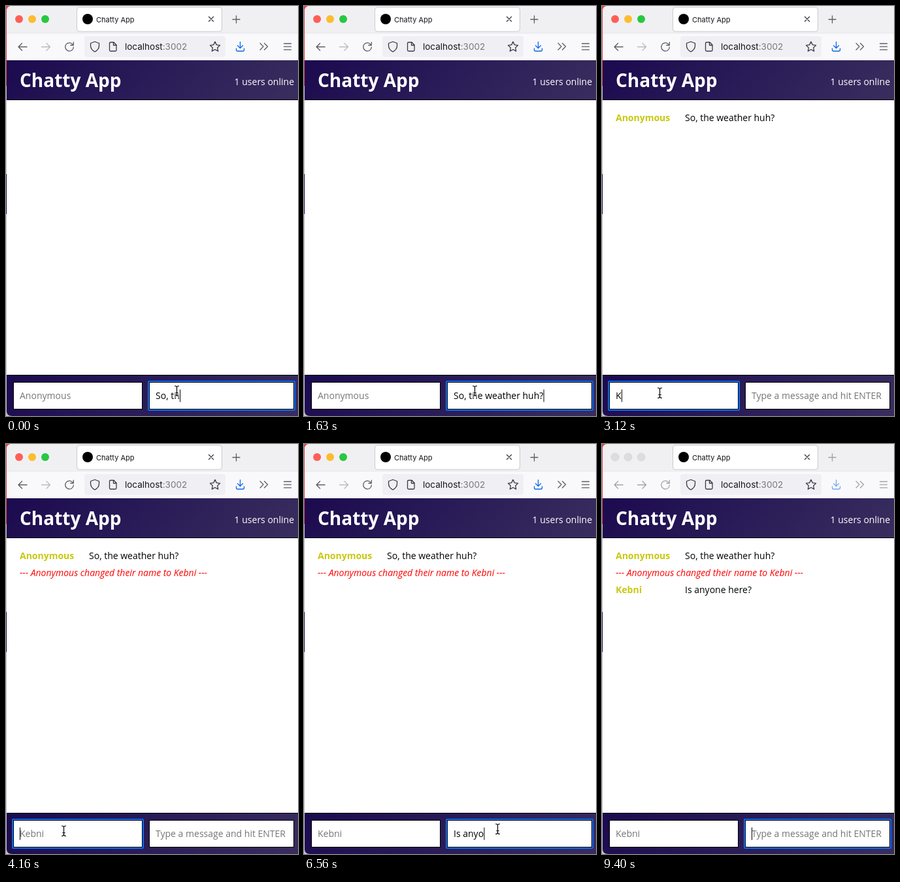
Write an HTML page that moves like this. It is 447 px wide and 627 px high and loops after 9500 ms.

```html
<!DOCTYPE html>
<html lang="en">
<head>
<meta charset="utf-8">
<title>Chatty App</title>
<style>
  html, body { margin: 0; width: 100%; height: 100%; overflow: hidden; background: #fff; }
  svg { display: block; width: 447px; height: 627px; }
  text { font: 14px "Open Sans", "Noto Sans", sans-serif; white-space: pre; }
  .ui { font-family: Inter, Roboto, sans-serif; fill: #15141a; }
  .author { font-weight: 700; fill: #c8c810; }
  .notice { font-style: italic; fill: #f00; }
  .line { fill: none; stroke: #5b5b66; stroke-width: 1.3; stroke-linecap: round; stroke-linejoin: round; }
  .dark { stroke: #3a3944; }
</style>
</head>
<body>
<svg viewBox="0 0 447 627">
  <defs>
    <linearGradient id="night" gradientUnits="userSpaceOnUse" x1="97" y1="-14" x2="351" y2="240">
      <stop offset="0" stop-color="#1b0a4f"/>
      <stop offset=".6" stop-color="#2d2059"/>
      <stop offset="1" stop-color="#3a2d5e"/>
    </linearGradient>
  </defs>

  <!-- desktop strip behind the window -->
  <rect width="447" height="627" fill="#c4c4c8"/>
  <rect width="8" height="122" fill="#dc4850"/>
  <rect y="257" width="1" height="61" fill="#1a1048"/>

  <!-- window -->
  <path d="M1 620V8Q1 0 9 0H447V627H9Q1 627 1 620Z" fill="#fff"/>
  <path d="M1 42V8Q1 0 9 0H447V42Z" fill="#f0f0f3"/>
  <rect x="1" y="42" width="446" height="41" fill="#f9f9fb"/>
  <rect x="1" y="41.5" width="446" height=".6" fill="#e2e2e7"/>

  <!-- tab strip -->
  <g id="lights" stroke-width=".5">
    <circle cx="20" cy="20" r="6"/>
    <circle cx="40" cy="20" r="6"/>
    <circle cx="60" cy="20" r="6"/>
  </g>
  <rect x="108.5" y="2" width="222" height="37" rx="4" fill="#fff" stroke="#c9c9cf" stroke-width="1"/>
  <circle cx="125" cy="20" r="8"/>
  <text class="ui" x="138" y="24.5" style="font-size:11px">Chatty App</text>
  <path class="line dark" stroke-width="1" d="M310.5 16.5l7 7m0-7l-7 7"/>

  <!-- toolbar -->
  <rect x="120" y="46" width="216" height="32" rx="4" fill="#f0f0f4"/>
  <g id="tools">
    <path class="line" d="M347 20.500h11m-5.500-5.500v11"/>
    <path class="line" d="M32 62.500H19m5.500-5.500l-5.500 5.500l5.500 5.500"/>
    <path class="line" id="forward" d="M54.500 62.500h13m-5.500-5.500l5.500 5.500l-5.500 5.500"/>
    <path class="line" d="M102.500 59.500A6.300 6.300 0 1 0 103.300 63M103.300 55.500v4.500h-4.500"/>
    <path class="line" style="stroke:#0a66e8" d="M358.500 55v9.500m-4-4l4 4l4-4M352.500 65v2q0 2 2 2h8q2 0 2-2v-2"/>
    <path class="line" d="M389 57l5 5l-5 5m6.500-10l5 5l-5 5"/>
    <path class="line" stroke-linecap="butt" d="M425.500 57.500h11m-11 4.700h11m-11 4.700h11"/>
  </g>
  <path class="line dark" d="M136 54.500l6.500 2.500v3.500q0 6-6.500 9.500q-6.500-3.500-6.500-9.500V57Z"/>
  <path class="line dark" d="M160 55.500h5l4 4v8q0 1.500-1.500 1.500h-7.500q-1.500 0-1.500-1.500V57q0-1.500 1.500-1.500Zm4.500 .5v4h4.500"/>
  <path class="line dark" d="M320 54.500l2.300 4.900l5.300 .7l-3.900 3.700l1 5.300l-4.700-2.600l-4.700 2.600l1-5.300l-3.900-3.700l5.300-.7Z"/>
  <text class="ui" x="182" y="67.300" style="font-size:13.5px">localhost<tspan fill="#77777f">:3002</tspan></text>

  <!-- header and footer -->
  <rect x="1" y="83" width="446" height="60" fill="url(#night)"/>
  <rect x="1" y="143" width="446" height="1"/>
  <text x="21" y="124" fill="#fff" style="font-size:28px;font-weight:700">Chatty App</text>
  <text x="441" y="121" fill="#fff" text-anchor="end">1 users online</text>
  <path transform="translate(0 482)" d="M1 83H447V145H9Q1 145 1 138Z" fill="url(#night)"/>
  <rect x="1" y="564" width="446" height="1"/>

  <g id="messages"></g>
  <g id="fields"></g>
  <rect id="caret" y="586.500" width="1" height="19"/>

  <g id="beam" fill="none" stroke-linecap="round">
    <path id="beamShape" d="M-3-7.500Q0-7.500 0-5V5.500Q0 8-3 8M3-7.500Q0-7.500 0-5M0 5.500Q0 8 3 8M-1.700 3h3.400" stroke="#fff" stroke-width="2.800"/>
    <use href="#beamShape" style="stroke:#000"/>
    <path d="M-3-7.500Q0-7.500 0-5V5.500Q0 8-3 8M3-7.500Q0-7.500 0-5M0 5.500Q0 8 3 8M-1.700 3h3.400" stroke="#000" stroke-width="1.200"/>
  </g>
  <path id="arrow" d="M0 0V14.500l3.300-3l2.200 5l2.400-1l-2.200-5h4.500Z" stroke="#fff"/>
</svg>

<script>
const LOOP = 9500, BLUR_AT = 9400;
const USER = "Kebni", FIRST = "So, the weather huh?", SECOND = "Is anyone here?";
const HINT = "Type a message and hit ENTER";

// Each track lists [time in ms, value]; a value holds until the next entry.
const firstTyped = [[0, 6], [150, 7], [300, 8], [450, 10], [600, 11], [750, 13], [890, 14],
  [1040, 16], [1190, 18], [1340, 19], [1630, 20], [1780, 0]];
const nameTyped = [[0, 0], [3120, 1], [3270, 2], [3570, 3], [3720, 4], [3860, 5], [4160, 0]];
const secondTyped = [[0, 0], [5660, 1], [5810, 2], [5960, 3], [6110, 4], [6260, 5], [6410, 6],
  [6560, 7], [6710, 8], [6860, 9], [7010, 11], [7150, 12], [7300, 13], [7450, 15], [7900, 0]];
const focusTrack = [[0, "message"], [2520, "name"], [4910, "message"]];
const caretTrack = [[0, true], [2520, false], [2670, true], [8500, false], [9100, true]];
const pointerTrack = [[0, [261, 588]], [2080, [222, 589]], [2220, [130, 591]], [2370, [92, 591]],
  [2520, [88, 591]], [4460, [120, 582]], [4610, [200, 549, "arrow"]], [4760, [280, 583]],
  [4910, [296, 588]], [8500, [430, 589]], [8650, null]];

const NS = "http://www.w3.org/2000/svg";
const $ = id => document.getElementById(id);

function add(parent, tag, attrs, text = "") {
  const node = document.createElementNS(NS, tag);
  for (const key in attrs) node.setAttribute(key, attrs[key]);
  node.textContent = text;
  return parent.appendChild(node);
}

function at(track, t) {
  let value = track[0][1];
  for (const [time, next] of track) if (time <= t) value = next;
  return value;
}

const show = (node, on) => node.setAttribute("visibility", on ? "visible" : "hidden");

function makeField(x, width) {
  const box = $("fields");
  return {
    x: x + 10,
    ring: add(box, "rect", { x: x - 2, y: 573, width: width + 4, height: 46, rx: 2, fill: "#0a6cf0" }),
    frame: add(box, "rect", { x: x + .5, y: 575.5, width: width - 1, height: 41, fill: "#fff", stroke: "#000" }),
    label: add(box, "text", { x: x + 10, y: 601 })
  };
}

function setField(field, typed, hint, focused) {
  field.label.textContent = typed || hint;
  field.label.setAttribute("fill", typed ? "#000" : "#757575");
  show(field.ring, focused);
  if (!focused) return;
  const offset = typed ? field.label.getComputedTextLength() + .3 : 0;
  $("caret").setAttribute("x", field.x + offset);
}

function makeRow(time, y, author, text) {
  const row = add($("messages"), "g", {});
  if (author) add(row, "text", { x: 21, y, class: "author" }, author);
  add(row, "text", author ? { x: 127, y } : { x: 21, y, class: "notice" }, text);
  return { time, row };
}

const nameField = makeField(11, 198);
const messageField = makeField(219, 222);
const rows = [
  makeRow(1930, 176, "Anonymous", FIRST),
  makeRow(4160, 202, "", `--- Anonymous changed their name to ${USER} ---`),
  makeRow(8050, 228, USER, SECOND)
];
const lights = [...$("lights").children];
const lightColors = ["#ff5f57", "#febc2e", "#28c840"];

function drawChrome(active) {
  lights.forEach((light, i) => {
    light.setAttribute("fill", active ? lightColors[i] : "#dddddf");
    light.setAttribute("stroke", active ? "none" : "#c9c9cc");
  });
  $("tools").setAttribute("opacity", active ? 1 : .55);
  $("forward").setAttribute("opacity", active ? .4 : 1);
}

function drawPointer(spot) {
  const isArrow = !!spot && spot[2] === "arrow";
  show($("arrow"), isArrow);
  show($("beam"), !!spot && !isArrow);
  if (spot) $(isArrow ? "arrow" : "beam").setAttribute("transform", `translate(${spot[0] + .5} ${spot[1] + .5})`);
}

function draw(t) {
  const focus = at(focusTrack, t);
  const typed = FIRST.slice(0, at(firstTyped, t)) || SECOND.slice(0, at(secondTyped, t));
  setField(nameField, USER.slice(0, at(nameTyped, t)), t < 4160 ? "Anonymous" : USER, focus === "name");
  setField(messageField, typed, HINT, focus === "message");
  show($("caret"), at(caretTrack, t));
  rows.forEach(({ time, row }) => show(row, t >= time));
  drawPointer(at(pointerTrack, t));
  drawChrome(t < BLUR_AT);
}

const start = performance.now();
function tick() {
  draw((performance.now() - start) % LOOP);
  requestAnimationFrame(tick);
}
tick();
</script>
</body>
</html>
```
